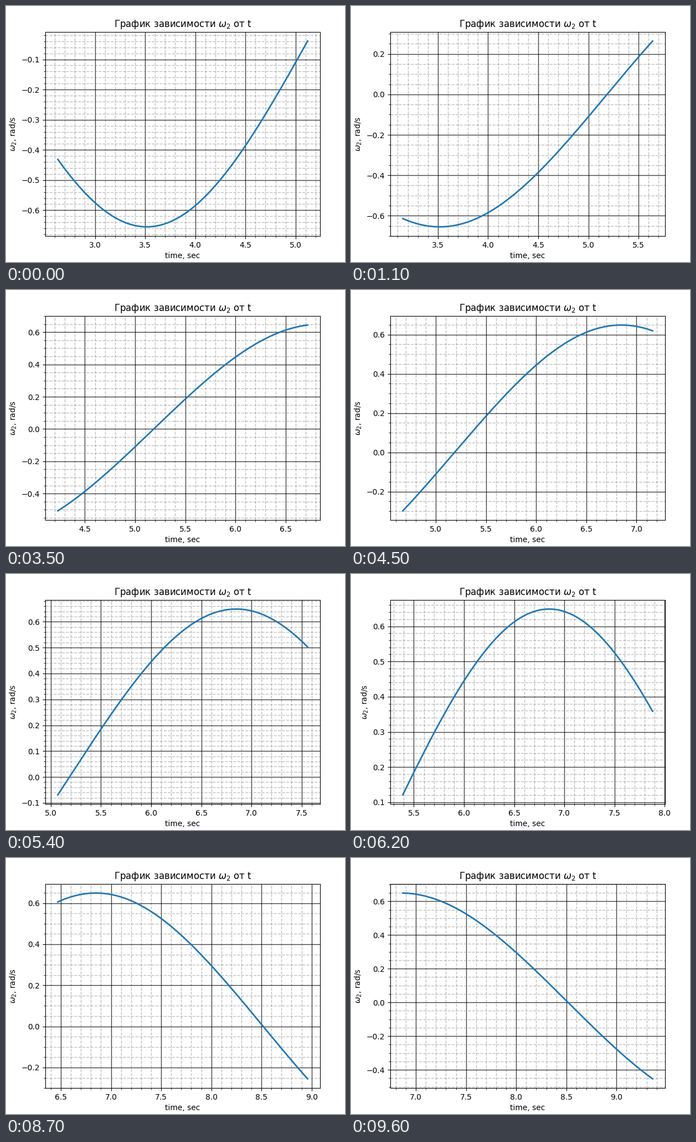
Recreate the animation shown at these times as a matplotlib script. Size 612 px wide and 463 px high, loop 9.7 s.

```python
import numpy as np
import matplotlib.pyplot as plt
from matplotlib.animation import FuncAnimation

W, H, DPI = 612, 463, 100
FRAMES, INTERVAL = 97, 100
DT, WINDOW = 0.01, 250     # sample spacing in seconds, samples on screen
FIRST_END, STEP = 5.12, 0.04

# Lightly damped pendulum: base swing plus a small third harmonic
T_PEAK, PEAK = 3.52, 0.655
FREQ, DAMPING, THIRD = 0.943, 0.0028, 0.0075


def omega(t):
    phase = FREQ * (t - T_PEAK)
    swing = (np.cos(phase) + THIRD * np.cos(3 * phase)) / (1 + THIRD)
    return -PEAK * np.exp(-DAMPING * (t - T_PEAK)) * swing


def window_end(frame):
    """Newest visible time; the solver slows down a little as it runs."""
    steps = round(frame * (1.148 - 0.00046 * frame))
    return FIRST_END + STEP * steps


fig = plt.figure(figsize=(W / DPI, H / DPI), dpi=DPI, facecolor="white")
ax = fig.add_axes([71 / W, 46.8 / H, 496 / W, 369.6 / H])
ax.set_title(r"График зависимости $\omega_2$ от t")
ax.set_xlabel("time, sec")
ax.set_ylabel(r"$\omega_2$, rad/s")
ax.minorticks_on()
ax.grid(which="major", color="black", linestyle="-", linewidth=1, alpha=0.75)
ax.grid(which="minor", color="gray", linestyle="--", linewidth=1, alpha=0.5)
line, = ax.plot([], [], color="tab:blue", linewidth=2)


def update(frame):
    t = window_end(frame) - DT * np.arange(WINDOW - 1, -1, -1)
    line.set_data(t, omega(t))
    ax.relim()
    ax.autoscale_view()
    return line,


anim = FuncAnimation(fig, update, frames=FRAMES, interval=INTERVAL,
                     init_func=lambda: update(0), repeat=True, repeat_delay=0)
plt.show()
```
